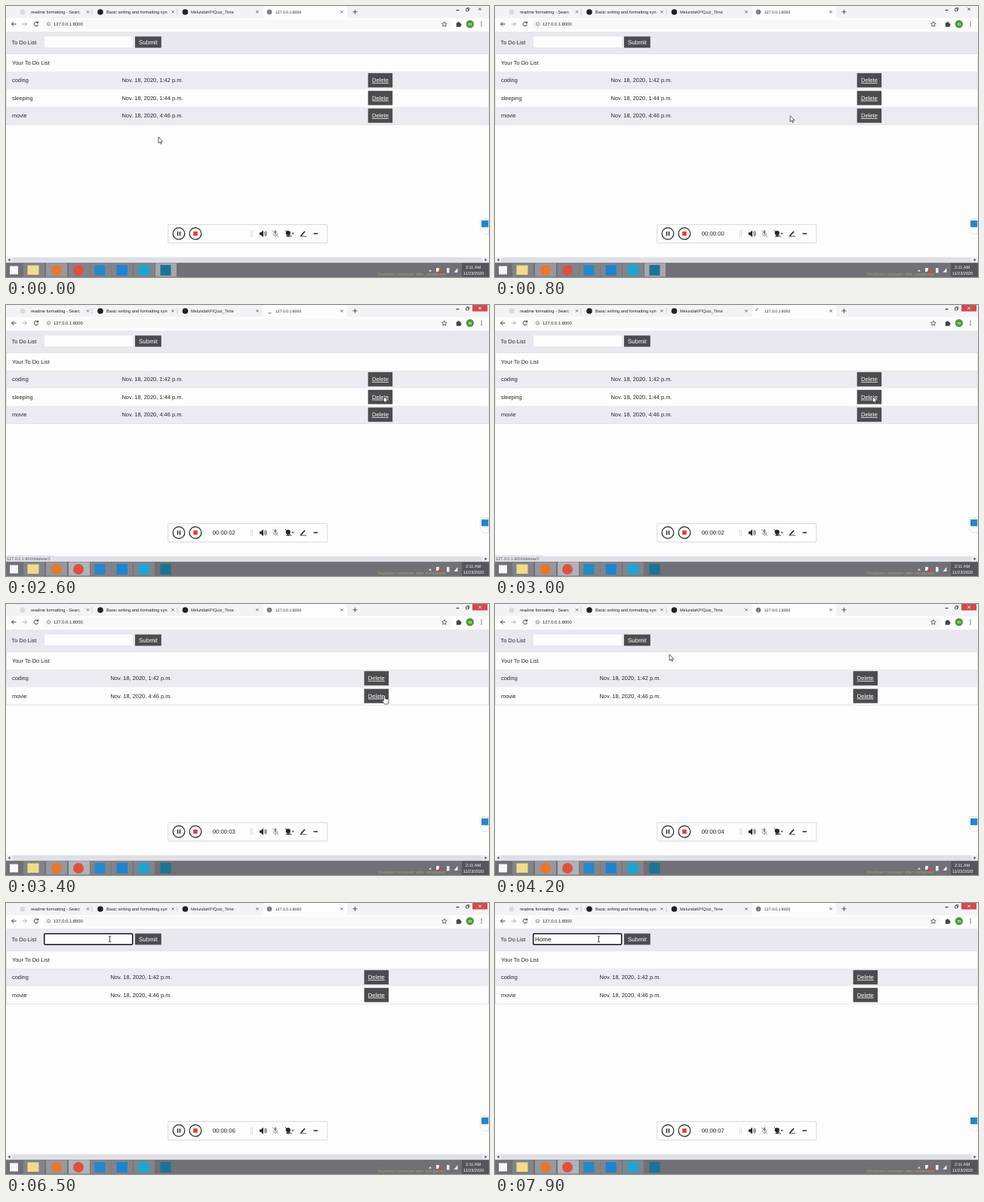
Animation, 640 px wide and 360 px high, one loop 8000 ms. Source, as an HTML page:

```html
<!DOCTYPE html>
<html lang="en">
<head>
<meta charset="utf-8">
<title>To Do List</title>
<style>
  html, body { margin: 0; width: 100%; height: 100%; overflow: hidden; background: #fdfdfd; }
  svg { display: block; width: 640px; height: 360px; }
  text { font-family: "Liberation Sans", Arial, sans-serif; text-rendering: geometricPrecision; white-space: pre; }
</style>
</head>
<body>
<svg id="stage" viewBox="0 0 640 360"></svg>
<script>
const LOOP = 8000;
const INK = '#26262a', DARK = '#4c4c50', PAPER = '#fdfdfd', STRIPE = '#ecebf1', BAR = '#e9e8ef', STRIP = '#f3f3f6';
const EDGE = '#e2e2e6';

const rect = (x, y, w, h, fill, more = '') =>
  `<rect x="${x}" y="${y}" width="${w}" height="${h}" fill="${fill}" ${more}/>`;
const disc = (x, y, r, fill, more = '') => `<circle cx="${x}" cy="${y}" r="${r}" fill="${fill}" ${more}/>`;
const line = (d, color = INK, width = 1, more = '') =>
  `<path d="${d}" fill="none" stroke="${color}" stroke-width="${width}" ${more}/>`;
const shape = (d, fill = INK, more = '') => `<path d="${d}" fill="${fill}" ${more}/>`;
const text = (x, y, size, str, fill = INK, more = '') =>
  `<text x="${x}" y="${y}" font-size="${size}" fill="${fill}" ${more}>${str}</text>`;
const group = (id, body) => `<g id="${id}">${body}</g>`;
const cross = (x, y, r, color = '#55555a', w = .8) =>
  line(`M${x - r} ${y - r}l${2 * r} ${2 * r}m0 ${-2 * r}l${-2 * r} ${2 * r}`, color, w);

function browser() {
  const divider = x => line(`M${x} 4v8`, '#b4b4bc', .6);
  const globe = disc(349, 8, 3.2, '#5a5a60') + line('M346 7h6M346 9.3h6M349 5v6', '#d4d4da', .5);
  return rect(0, 0, 640, 17, STRIP) +
    shape('M338 17q3 0 3-3V3q0-3 3-3h105q3 0 3 3v11q0 3 3 3z', PAPER) +
    rect(0, 16, 640, 18, PAPER) +
    disc(22, 8, 3.5, '#dadae0') + text(33, 10, 5.6, 'readme formatting - Searc') +
    disc(125, 8, 3.8, '#222') + text(133, 10, 5.72, 'Basic writing and formatting syn') +
    disc(237.5, 8, 3.8, '#222') + text(245, 10, 5.55, 'MelundaKP/Quiz_Time') +
    group('globe', globe) + group('spinner', line('M346 8a3 3 0 0 1 3-3', '#85858c', 1)) +
    text(357, 10, 5.15, '127.0.0.1:8000') +
    divider(114) + divider(227) +
    [108.5, 221, 333, 445].map(x => cross(x, 7.8, 1.7)).join('') +
    line('M459.5 7.8h6m-3-3v6', '#444448', .9) +
    group('closeActive', rect(618, 0, 20, 8.5, '#d34a4e')) +
    line('M596.5 5.5h4', INK, 1) + line('M609.5 3.8h3v3h-3zM610.8 3.5v-1h3v3h-1', INK, .7) +
    group('closeMark', cross(628, 4.2, 1.7, 'currentColor', .9)) +
    rect(49, 18.5, 542, 12, '#f8f8fa', 'rx="6"') +
    line('M13.5 24h-6m2.8-2.8L7.5 24l2.8 2.8', INK, .9) +
    line('M21.5 24h6m-2.8-2.8l2.8 2.8l-2.8 2.8', '#a8a8ae', .9) +
    line('M42.2 22.2a2.8 2.8 0 1 0 .5 2.5M42.6 20.6v2.2h-2.2', INK, .9) +
    disc(56.5, 24, 2.2, 'none', 'stroke="#55555a" stroke-width=".6"') + line('M56.5 23.6v1.5', '#55555a', .6) +
    text(63, 26.1, 5.8, '127.0.0.1:8000') +
    shape('M580.8 20.8l1 2.2 2.4.3-1.8 1.6.5 2.3-2.1-1.2-2.1 1.2.5-2.3-1.8-1.6 2.4-.3z', 'none', 'stroke="#333" stroke-width=".7"') +
    shape('M596.8 22.2h1.7a1.2 1.2 0 0 1 2.4 0h1.6v1.7a1.2 1.2 0 0 1 0 2.4v1.5h-5.7z', '#444448') +
    disc(614.8, 24, 5.2, '#4f9a3c') + text(614.8, 26, 5.8, 'm', '#fff', 'text-anchor="middle"') +
    [21.5, 24, 26.5].map(y => disc(630, y, .7, INK)).join('');
}

function list(items, dateX, buttonX) {
  const bottom = 87 + items.length * 23.5;
  return items.map(([name, time], i) => {
    const y = 87 + i * 23.5;
    return (i % 2 ? '' : rect(0, y, 640, 23.5, STRIPE)) +
      text(8, y + 14, 7.4, name) +
      text(dateX, y + 14, 7.45, `Nov. 18, 2020, ${time} p.m.`) +
      rect(buttonX, y + 2.2, 32.5, 19, DARK) +
      text(buttonX + 16.2, y + 14.2, 7.6, 'Delete', '#fff', 'text-anchor="middle" text-decoration="underline"');
  }).join('') + rect(.5, 63.5, 639, bottom - 63.5, 'none', `stroke="${EDGE}"`);
}

function page() {
  const coding = ['coding', '1:42'], sleeping = ['sleeping', '1:44'], movie = ['movie', '4:46'];
  return rect(0, 34, 640, 29.5, BAR) + text(7.5, 50.5, 7.4, 'To Do List') +
    rect(51, 40.5, 117, 14.5, PAPER) +
    group('focusRing', rect(50.7, 40.7, 117, 14.6, '#fff', 'rx="1.5" stroke="#131316" stroke-width="1.5"')) +
    text(53, 50.8, 8, '', '#111', 'id="entry"') + group('caret', rect(0, 43.8, .7, 8.6, '#111')) +
    rect(171, 40.5, 34.8, 15, DARK) + text(188.4, 50.8, 8, 'Submit', '#fff', 'text-anchor="middle"') +
    text(8, 77.5, 7.4, 'Your To Do List') +
    group('before', list([coding, sleeping, movie], 153.5, 479.7)) +
    group('after', list([coding, movie], 138.5, 474.6)) +
    rect(0, 333.5, 640, 7.5, '#f1f1f4') + rect(8, 334, 623, 6.5, '#dfdfe6') +
    shape('M2.5 337.3l3-2v4z', '#55555a') + shape('M637.5 337.3l-3-2v4z', '#55555a') +
    group('status', rect(0, 332.5, 64, 8.5, '#e3e3e8') + text(1, 339, 5.5, '127.0.0.1:8000/delete/2', '#55555a')) +
    shape('M640 282.5h-9q-2.5 0-2.5 2.5v13l4 4.5h7.5z', PAPER, 'stroke="#d9d9e4" stroke-width=".7"') +
    rect(630, 284.8, 9.2, 9, '#2486c8');
}

function recorder() {
  return rect(214.8, 290.3, 211, 24.6, PAPER, 'rx="1.5" stroke="#dddde8" stroke-width="1.2"') +
    [229, 251].map(x => disc(x, 302.4, 7.8, PAPER, 'stroke="#232326" stroke-width="1.2"')).join('') +
    rect(226.8, 299.6, 1.5, 5.6, INK) + rect(229.8, 299.6, 1.5, 5.6, INK) +
    rect(248.2, 299.6, 5.6, 5.6, '#ea3a33', 'rx=".6"') +
    text(273.7, 305.1, 7.75, '', INK, 'id="timer"') +
    line('M324.5 298v9M326.7 298v9', '#d0d0d8', .7) +
    shape('M336 300.7h2l3-2.6v8.8l-3-2.6h-2z') +
    line('M342.4 300.3q1.7 2.1 0 4.2M343.8 298.8q3 3.6 0 7.2', INK, .9) +
    rect(355.6, 298, 2.8, 5, '#88888e', 'rx="1.4"') +
    line('M354 302q0 3 3 3t3-3M357 305v2M353 298l8 9', '#88888e', .8) +
    disc(373.8, 301.5, 3.1, INK) + shape('M371 306.5l1.5-2h2.6l1.5 2z') +
    line('M370 298l8.5 9', INK, 1) + shape('M378.6 301.5h3l-1.5 2z') +
    line('M390.5 305.5l5.5-6', INK, 1.8) + line('M389.5 306.3q4.5-1 8.5 0', INK, .8) +
    line('M407.5 302.4h5.5', INK, 1.5);
}

function taskbar() {
  const slot = (x, opacity) => rect(x, 341.5, 28, 18, '#f2f2fa', `opacity="${opacity}"`);
  return rect(0, 341, 640, 19, '#707076') + rect(604, 341, 36, 19, '#55555b') + line('M0 341.3h640', '#8c8c92', .6) +
    slot(23, .15) + slot(53, .3) + [83, 111.5, 140, 169].map(x => slot(x, .15)).join('') +
    group('chromeOn', slot(83, .42)) + group('recorderOn', slot(198, .42)) +
    rect(5, 345.5, 11, 11, '#f8f8fa') +
    rect(28.5, 344.5, 15, 12.5, '#f1dc8c') +
    disc(67, 351, 7, '#e8782a') + disc(96, 351, 7, '#dd5140') +
    rect(117.5, 344, 14, 14, '#2489ca') + rect(146.5, 344, 14.5, 14, '#1f83cf') +
    rect(175.5, 344, 14.5, 14, '#21a5d0') + rect(204.5, 344, 14, 14, '#1b7396') +
    text(492, 358.4, 5.55, 'Shutdown computer after completion', '#a8a070') +
    shape('M560 352.5l2-2.3 2 2.3z', '#f4f4f6') +
    rect(570, 348, 4, 5, '#ececf0') + disc(575, 353, 2.2, '#d84338') +
    rect(584, 348, 3.5, 6.5, '#ececf0') + shape('M593.5 354h5v-6z', '#ececf0') +
    text(619, 349.3, 5.6, '2:11 AM', '#fff', 'text-anchor="middle"') +
    text(619.5, 357.3, 5.6, '11/23/2020', '#fff', 'text-anchor="middle"');
}

const pointers = {
  arrow: shape('M0 0v8.2l1.9-1.7 1.3 2.9 1.2-.6-1.2-2.7h2.5z', '#fff', 'stroke="#222" stroke-width=".7"'),
  hand: shape('M0 1q0-1 .9-1t.9 1v3.2l4 .9q1 .3.9 1.3l-.6 3.2-.7 1.9H1.2L-1.8 7.7q-.3-1 .6-1.2l1.2.8z', '#fff', 'stroke="#222" stroke-width=".6"'),
  beam: line('M-1.6-4q1.6 0 1.6 1q0-1 1.6-1M0-3.5v7M-1.6 4q1.6 0 1.6-1q0 1 1.6 1', '#222', .8)
};

document.getElementById('stage').innerHTML = rect(0, 0, 640, 360, PAPER) + page() + browser() + taskbar() + recorder() +
  group('pointer', Object.entries(pointers).map(([id, body]) => group(id, body)).join(''));

const el = id => document.getElementById(id);
const show = (id, on) => el(id).style.display = on ? '' : 'none';

// Pointer stops: time, x, y
const route = [[0, 202, 174], [100, 202, 174], [1330, 515, 127], [1700, 500.5, 121.5],
  [3400, 500.5, 121.5], [4600, 137.5, 48], [LOOP, 137.5, 48]];
const HOVER = 1900, CLICK = 2600, LOADED = 3300, FOCUS = 4900;
const keys = [6800, 7100, 7250, 7400];
const caretStops = [53, 58.8, 63.2, 69.9, 74.4];

function pointerAt(t) {
  const i = route.findIndex(stop => stop[0] > t);
  const [t0, x0, y0] = route[i - 1], [t1, x1, y1] = route[i];
  const p = (t - t0) / (t1 - t0), e = p * p * (3 - 2 * p);
  return [x0 + (x1 - x0) * e, y0 + (y1 - y0) * e];
}

function pointerKind(x, y, loading) {
  if (x > 51 && x < 168 && y > 40 && y < 56) return 'beam';
  const onButton = x > 479 && x < 512 && y > 89 && y < 132 && (y < 108 || y > 112);
  return onButton && !loading ? 'hand' : 'arrow';
}

function draw(t) {
  const active = t >= CLICK, loading = active && t < LOADED;
  show('closeActive', active);
  el('closeMark').style.color = active ? '#fff' : '#444448';
  show('chromeOn', active);
  show('recorderOn', !active);
  show('status', t >= HOVER && t < LOADED);
  show('globe', !loading);
  show('spinner', loading);
  el('spinner').setAttribute('transform', `rotate(${t * .36} 349 8)`);
  show('before', t < LOADED);
  show('after', t >= LOADED);

  el('timer').textContent = t < 200 ? '' : '00:00:0' + Math.floor((t - 200) / 1000);

  const typed = keys.filter(k => k <= t).length;
  const blinkStart = typed ? keys[typed - 1] : FOCUS;
  show('focusRing', t >= FOCUS);
  el('entry').textContent = 'Home'.slice(0, typed);
  show('caret', t >= FOCUS && (t - blinkStart) % 1000 < 500);
  el('caret').setAttribute('transform', `translate(${caretStops[typed] + .3})`);

  const [x, y] = pointerAt(t), kind = pointerKind(x, y, loading);
  for (const id in pointers) show(id, id === kind);
  el('pointer').setAttribute('transform', `translate(${x} ${y})`);
}

function tick() {
  draw(performance.now() % LOOP);
  requestAnimationFrame(tick);
}
tick();
</script>
</body>
</html>
```
